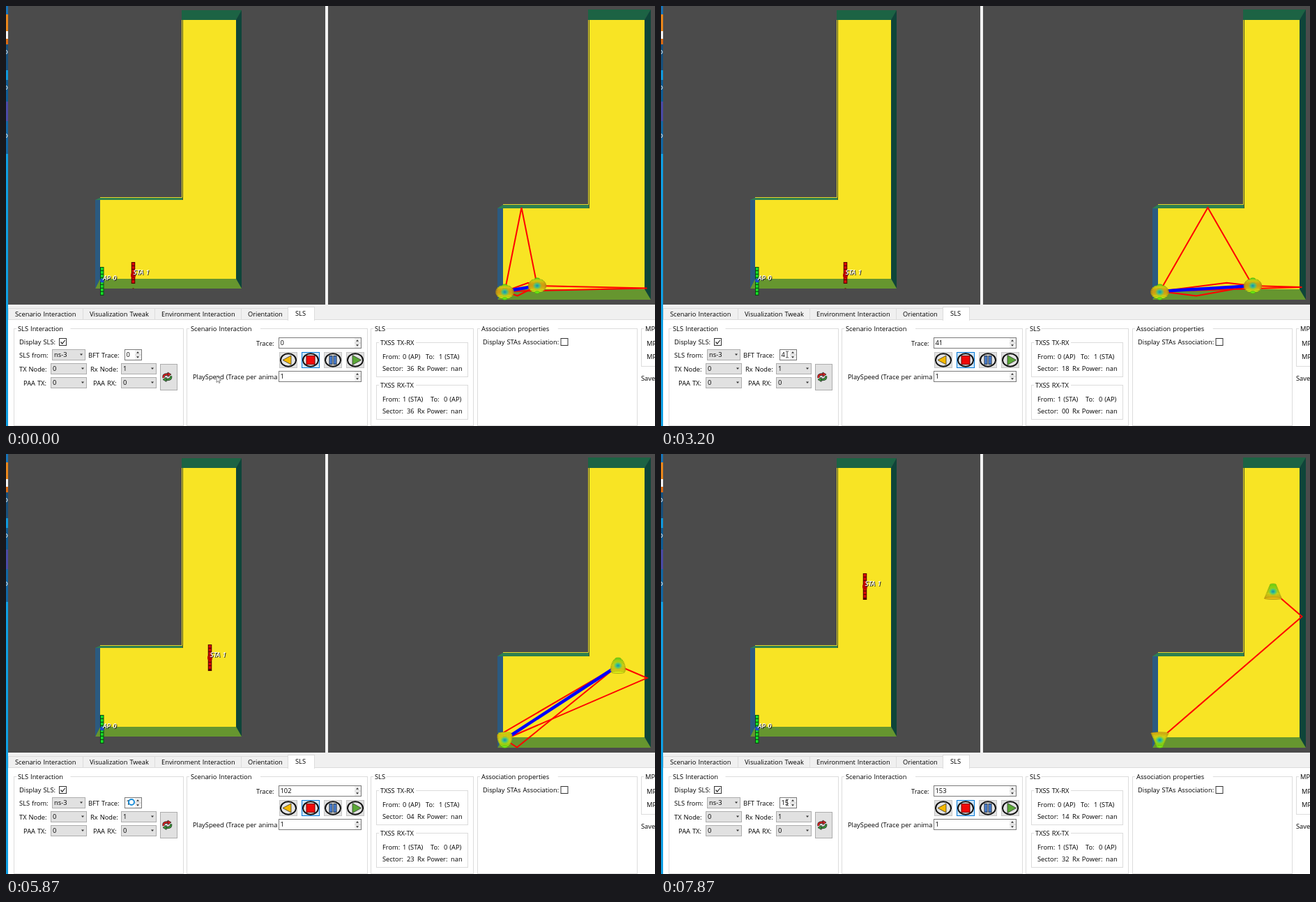
Write an HTML page that moves like this. It is 931 px wide and 602 px high and loops after 8 s.

```html
<!DOCTYPE html>
<html lang="en">
<head>
<meta charset="utf-8">
<title>SLS viewer</title>
<style>
html, body { margin: 0; width: 100%; height: 100%; overflow: hidden; background: #fff; }
svg { display: block; width: 931px; height: 602px; }
text { font: 9.3px "Open Sans", "Noto Sans", sans-serif; word-spacing: .6px; white-space: pre; }
.tag { font: italic 600 9.5px "Open Sans", "Noto Sans", sans-serif; }
</style>
</head>
<body>
<svg viewBox="0 0 931 602">
  <defs>
    <radialGradient id="core">
      <stop offset="0" stop-color="#1488b8"/>
      <stop offset=".45" stop-color="#22c4a0" stop-opacity=".8"/>
      <stop offset="1" stop-color="#50d860" stop-opacity="0"/>
    </radialGradient>
  </defs>
  <g id="base"></g>
  <g id="live"></g>
</svg>
<script>
const LOOP = 8000;
const STARTS = [1530, 2070, 2600, 3070, 3270, 3470, 4070, 4530, 5000, 5470, 5870, 6330, 6870, 7330, 7800];
const TX = ['36', '00', '18', '00', '18', '18', '00', '00', '02', '04', '04', '03', '04', '05', '13', '14'];
const RX = ['36', '18', '00', '00', '00', '00', '36', '34', '33', '23', '23', '24', '22', '21', '32', '32'];

const rect = (x, y, w, h, fill, stroke) =>
  `<rect x="${x}" y="${y}" width="${w}" height="${h}" fill="${fill}"${stroke ? ` stroke="${stroke}"` : ''}/>`;
const box = (x, y, w, h, fill, stroke) => rect(x + .5, y + .5, w - 1, h - 1, fill, stroke);
const poly = (points, fill, extra = '') => `<polygon points="${points}" fill="${fill}" ${extra}/>`;
const path = (d, stroke, width, fill = 'none') =>
  `<path d="${d}" stroke="${stroke}" stroke-width="${width}" fill="${fill}"/>`;
const ellipse = (x, y, rx, ry, fill, extra = '') =>
  `<ellipse cx="${x}" cy="${y}" rx="${rx}" ry="${ry}" fill="${fill}" ${extra}/>`;
const text = (x, y, s) => `<text x="${x}" y="${y}">${s}</text>`;
const tag = (x, y, s) => [['#222', 1], ['#fff', 0]].map(([fill, d]) =>
  `<text class="tag" x="${x + d}" y="${y + d}" fill="${fill}">${s}</text>`).join('');

// L-shaped room seen from above: outer and inner edges of the walls
function room({ l, il, nx, r, ir, t, it, cy, c0, f, b }) {
  return poly(`${nx + 2},${it} ${ir},${it} ${ir},${f} ${il},${f} ${il},${cy} ${nx + 2},${cy}`, '#f8e424')
    + poly(`${nx},${t} ${r},${t} ${ir},${it} ${nx},${it}`, '#1c6344')
    + poly(`${r},${t} ${r},${b} ${ir},${f} ${ir},${it}`, '#0e4539')
    + poly(`${il},${f} ${ir},${f} ${r},${b} ${l},${b}`, '#66962f')
    + poly(`${l},${cy} ${il},${c0 + 1} ${il},${f} ${l},${b}`, '#2b5a80')
    + poly(`${l},${cy} ${il},${c0 + 1} ${nx + 1},${c0 + 1} ${nx + 1},${cy}`, '#2e8050')
    + path(`M${il},${c0 + .5}H${nx + .5}V${it}`, '#e8d52a', 1)
    + path(`M${nx + 1.5},${it}V${cy}`, '#4d5526', 1);
}

function group(x, y, w, h, title, inset = 6) {
  return box(x, y, w, h, 'none', '#dcdcdc')
    + rect(x + inset - 2, y - 2, title.length * 4.9 + 4, 5, '#fff')
    + text(x + inset, y + 4, title);
}

const chevron = (x, y, s) => poly(`${x - 2},${y} ${x + 2},${y} ${x},${y + 2.4 * s}`, '#333');

function combo(x, y, w, value, hot) {
  return box(x, y, w, 16, hot ? '#e5f1fb' : '#e1e1e1', hot ? '#0078d7' : '#adadad')
    + text(x + 3, y + 11, value) + chevron(x + w - 6, y + 6.5, 1);
}

function spin(x, y, w, value) {
  const a = x + w - 6;
  return box(x, y, w, 16, '#fff', '#7a7a7a')
    + rect(a - 4, y + 1, 9, 14, '#f0f0f0')
    + path(`M${a - 4},${y + 8}h9`, '#ccc', 1)
    + chevron(a, y + 5.7, -1) + chevron(a, y + 10.3, 1)
    + text(x + 2.5, y + 11, value);
}

const check = (x, y, on) => box(x, y, 11, 11, '#fff', '#333')
  + (on ? path(`M${x + 2.5},${y + 5.5}l2.2,2.5l4,-5`, '#222', 1.2) : '');

function player(x, icon, active) {
  return box(x, 496, 26, 23, active ? '#cce4f7' : '#e1e1e1', active ? '#0078d7' : '#c4c4c4')
    + ellipse(x + 13, 507.5, 11, 9.3, '#e4e4e4', 'stroke="#111" stroke-width="2"') + icon;
}

function desktopStrip() {
  const bands = [[0, '#1874b8'], [12, '#e8861c'], [36, '#f4f4f4'], [47, '#d86a14'], [55, '#17507c'],
    [92, '#1098dc'], [106, '#0f5c94'], [137, '#4a4aa6'], [165, '#1267a4'], [212, '#0f9fe4']];
  return bands.map(([y, c], i) => rect(0, y, 3, (bands[i + 1] || [602])[0] - y, c)).join('')
    + [66, 117, 186].map(y => ellipse(0, y, 2, 2.5, 'none', 'stroke="#eee"')).join('');
}

function baseView() {
  const edge = 'stroke="#222" stroke-width=".7"';
  let s = rect(0, 0, 931, 602, '#fff') + rect(3, 0, 928, 428, '#4b4b4b') + rect(458, 0, 4, 428, '#f2f2f2')
    + room({ l: 128, il: 135, nx: 252, r: 338, ir: 330, t: 6, it: 20, cy: 278, c0: 274, f: 391, b: 405 })
    + room({ l: 705, il: 713, nx: 835, r: 925, ir: 916, t: 5, it: 20, cy: 290, c0: 284, f: 406, b: 421 })
    + rect(3, 428, 928, 21, '#f0f0f0') + path('M3,449.5H931', '#dcdcdc', 1);
  for (const [x, w, name] of [[3, 107, 'Scenario Interaction'], [110, 103, 'Visualization Tweak'],
    [213, 124, 'Environment Interaction'], [337, 68, 'Orientation']])
    s += box(x, 433, w + 1, 17, '#f0f0f0', '#dcdcdc') + text(x + 10, 445, name);
  s += box(404, 431, 39, 20, '#fff', '#dcdcdc') + rect(405, 449, 37, 3, '#fff') + text(415, 444, 'SLS')
    + desktopStrip()
    + group(11, 462, 244, 140, 'SLS Interaction')
    + group(259, 462, 260, 140, 'Scenario Interaction')
    + group(523, 462, 148, 140, 'SLS')
    + group(531, 482, 132, 50, 'TXSS TX-RX')
    + group(531, 543, 132, 50, 'TXSS RX-TX')
    + group(676, 462, 230, 140, 'Association properties')
    + group(911, 462, 40, 55, 'MPC')
    + text(19, 485, 'Display SLS:') + check(76, 476, true)
    + text(19, 504, 'SLS from:') + combo(66, 492, 48, 'ns-3') + text(118, 504, 'BFT Trace:')
    + text(19, 524, 'TX Node:') + combo(64, 512, 52, '0') + text(121, 524, 'Rx Node:')
    + text(25, 544, 'PAA TX:') + combo(64, 532, 52, '0')
    + text(125, 544, 'PAA RX:') + combo(165, 532, 51, '0')
    + box(221, 513, 25, 38, '#e1e1e1', '#adadad')
    + path('M226,533q-1,-5 5,-5h2', '#222', 3.4) + path('M226,533q-1,-5 5,-5h2', '#d82020', 2)
    + poly('232,525 237,528 232,531.5', '#d82020', edge)
    + path('M236.500,530.5q1,5 -5,5h-2', '#222', 3.4) + path('M236.500,530.5q1,5 -5,5h-2', '#3a9a3a', 2)
    + poly('230,532 225,535.5 230,538.5', '#3a9a3a', edge)
    + text(359, 487, 'Trace:')
    + player(392, poly('397,507.5 409,501 409,514', '#f5b800', edge))
    + player(424, rect(431, 501.5, 12, 12, '#f00808', '#700'), true)
    + player(456, rect(464, 501.5, 4, 12, '#4a80d4', '#234') + rect(470, 501.5, 4, 12, '#4a80d4', '#234'))
    + player(488, poly('497,500.5 509.500,507.5 497,514.5', '#5aa836', edge))
    + text(268, 535, 'PlaySpeed (Trace per anima') + spin(391, 523, 119, '1')
    + text(684, 485, 'Display STAs Association:') + check(795.5, 476, false)
    + text(919, 487, 'MPCs') + text(919, 506, 'MPCs') + text(911, 537, 'Save');
  for (const [y, cells] of [
    [506, [540, 'From:', 569, '0 (AP)', 602, 'To:', 621, '1 (STA)']],
    [567, [540, 'From:', 569, '1 (STA)', 609, 'To:', 628, '0 (AP)']],
    [523, [540, 'Sector:', 590, 'Rx Power:', 638, 'nan']],
    [584, [540, 'Sector:', 590, 'Rx Power:', 638, 'nan']]])
    for (let i = 0; i < cells.length; i += 2) s += text(cells[i], y, cells[i + 1]);
  return s + antenna(135, 374, 41, '#16e426', '#0a4a12') + ellipse(138, 393.5, 3, 3, '#1c50c8')
    + tag(139, 393, 'AP 0');
}

function antenna(x, y, h, fill, dark) {
  let s = rect(x, y, 5.5, h, dark);
  for (let d = 1; d < h - 2; d += 5) s += rect(x + 1, y + d, 3.5, 3.8, fill);
  return s;
}

// Radiation pattern: stacked discs, from a ball to a bell
function lobe(x, y, cone, dir) {
  let s = '';
  for (let i = -5; i <= 5; i++) {
    const v = i / 5;
    const w = Math.sqrt(1.08 - v * v) * (1 - cone) + (.68 + .32 * v * dir) * cone;
    const hue = 115 - 68 * w;
    s += ellipse(x, y + v * 9.5, 12.8 * w, 1.7, `hsl(${hue} 85% 50%)`, `stroke="hsl(${hue} 80% 34%)" stroke-width=".7"`);
  }
  return s + ellipse(x, y, 7, 6, 'url(#core)');
}

const traceOf = n => Math.round(10.18 * n);

// The station walks right, then turns up the corridor
function leftScene(trace) {
  const x = Math.min(182.5 + 2 * trace, 292.5);
  const top = 367 - 2 * Math.max(0, trace - 55);
  return antenna(x - 2.75, top, Math.min(38, 398 - top), '#dc0808', '#500')
    + (top > 366 ? rect(x - 1, 404, 2, 1.5, '#703018') : '')
    + ellipse(x, top + 19, 3.5, 4, '#b80000') + tag(x, top + 18, 'STA 1');
}

function rightScene(trace) {
  const ax = 715.5, ay = 409;
  const sx = Math.min(762 + 2.12 * trace, 878);
  const climb = 2.08 * Math.max(0, trace - 55);
  const sy = 401 - climb;
  const dx = sx - ax, dy = sy - ay;
  const ray = (x, y) => path(`M${ax},${ay}L${x},${y}L${sx},${sy}`, '#f00', 2);
  const wall = 919.5 - ax;
  let s = ray(919.5, ay + dy * wall / (2 * wall - dx));
  // the room corner hides every other ray once the station is high enough
  if (sy > 246) {
    const apex = ax + dx * 127 / (254 + dy);
    if (apex < 836) s += ray(apex, 289);
    s += ray(ax + dx * 14.5 / (29 - dy), 415.5 + 5 * (1 - Math.exp(-climb / 15)));
    s += trace < 90 ? ray(ax + dx * .72, ay + dy * .72 - 6.5) : ray(706, ay + dy * .05);
    s += path(`M${ax},${ay}L${sx},${sy}`, '#00f', 4.5);
  }
  const cone = Math.min(1, Math.max(0, (trace - 50) / 80));
  return s + lobe(ax, 410, cone, -1) + lobe(sx, sy, cone, 1);
}

const TRACK = [[70, 302, 530], [330, 268, 537], [870, 196, 516], [1130, 181, 499]];

function pointerAt(t) {
  if (t <= 70) return [302, 530];
  const i = TRACK.findIndex(p => t < p[0]);
  const [t0, x0, y0] = TRACK[i - 1], [t1, x1, y1] = TRACK[i];
  const k = (t - t0) / (t1 - t0);
  return [x0 + (x1 - x0) * k, y0 + (y1 - y0) * k];
}

function pointer(t, busy) {
  if (busy) return ellipse(180, 499, 4, 4, '#fff', 'stroke="#1e8fd8" stroke-width="2"');
  if (t >= 1130) return path('M179,495h1.500l.5,.5l.5,-.5h1.500M181,495.5v8M179,504h1.500l.5,-.5l.5,.5h1.500', '#333', .9);
  const [x, y] = pointerAt(t);
  return poly('0,0 0,9.500 2.200,7.500 3.700,10.500 5,9.900 3.700,7 6.500,6.700', '#fff',
    `stroke="#333" stroke-width=".6" transform="translate(${x} ${y})"`);
}

function liveView(t) {
  const n = STARTS.filter(s => t >= s).length;
  const since = n ? t - STARTS[n - 1] : LOOP;
  const quick = n >= 14, eager = quick || n === 9;
  const left = eager || since >= 60 ? n : n - 1;
  const loading = since < (quick ? 60 : 130);
  const right = loading ? n - 1 : n;
  const busy = loading && !(n === 9 && since < 60);
  const [px, py] = t < 1130 ? pointerAt(t) : [0, 0];
  const hot = px > 165 && px < 216 && py > 511 && py < 529;
  return leftScene(traceOf(left)) + rightScene(traceOf(right))
    + spin(170, 492, 25, left) + combo(165, 512, 51, '1', hot)
    + spin(391, 475, 119, traceOf(right))
    + text(575, 523, TX[right]) + text(575, 584, RX[right])
    + pointer(t, busy);
}

const live = document.getElementById('live');
document.getElementById('base').innerHTML = baseView();
let shown = '';
const begin = performance.now();
function tick() {
  const view = liveView((performance.now() - begin) % LOOP);
  if (view !== shown) live.innerHTML = shown = view;
  requestAnimationFrame(tick);
}
tick();
</script>
</body>
</html>
```
